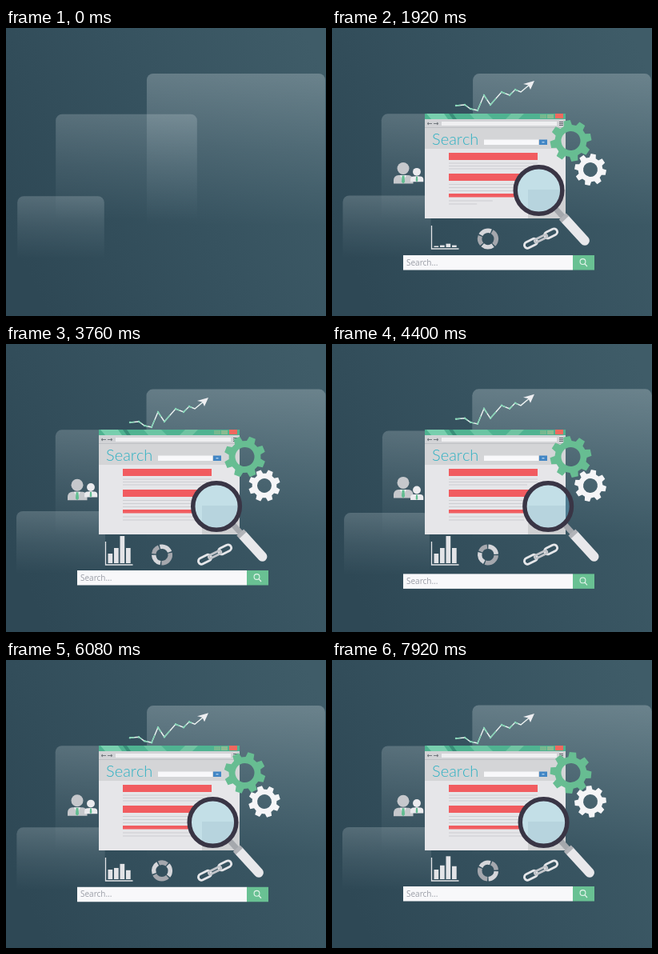
An HTML page with a canvas for the animation above (8000 ms loop, 400x360 px).

```html
<!DOCTYPE html>
<html lang="en">
<head>
<meta charset="utf-8">
<title>Search</title>
<style>
html, body { margin: 0; width: 100%; height: 100%; overflow: hidden; background: #34505e; }
canvas { display: block; width: 400px; height: 360px; }
</style>
</head>
<body>
<canvas id="stage" width="400" height="360"></canvas>
<script>
const c = document.getElementById('stage').getContext('2d');
const LOOP = 8000, STEP = 80, SWAY = 2100, TAU = Math.PI * 2;

const clamp = v => Math.max(0, Math.min(1, v));
const part = (t, from, to) => clamp((t - from) / (to - from));
const easeOut = (u, p = 3) => 1 - Math.pow(1 - u, p);
const smooth = u => (1 - Math.cos(Math.PI * u)) / 2;
const wave = (t, peak) => Math.cos((t - peak) / SWAY * TAU);
const mix = (a, b, u) => a + (b - a) * u;

function pop(t, from, to) {
  const u = part(t, from, to) - 1;
  return 1 + 2.4 * u * u * u + 1.4 * u * u;
}

function keys(t, list) {
  for (let i = 1; i < list.length; i++) {
    const [t0, a] = list[i - 1], [t1, b] = list[i];
    if (t < t1) return mix(a, b, smooth(part(t, t0, t1)));
  }
  return list[list.length - 1][1];
}

function rect(color, x, y, w, h) {
  c.fillStyle = color;
  c.fillRect(x, y, w, h);
}

function disc(color, x, y, r) {
  c.fillStyle = color;
  c.beginPath();
  c.arc(x, y, r, 0, TAU);
  c.fill();
}

function poly(color, points) {
  c.fillStyle = color;
  c.beginPath();
  points.forEach(p => c.lineTo(p[0], p[1]));
  c.fill();
}

function stroke(color, width, points) {
  c.strokeStyle = color;
  c.lineWidth = width;
  c.beginPath();
  points.forEach(p => c.lineTo(p[0], p[1]));
  c.stroke();
}

// Draws in a local frame scaled about (x, y).
function at(x, y, scale, angle, draw) {
  if (scale <= 0.01) return;
  c.save();
  c.translate(x, y);
  c.rotate(angle);
  c.scale(scale, scale);
  draw();
  c.restore();
}

function backdrop() {
  const g = c.createLinearGradient(0, 250, 400, 60);
  g.addColorStop(0, '#2e4855');
  g.addColorStop(0.5, '#36525f');
  g.addColorStop(1, '#3f5c68');
  rect(g, 0, 0, 400, 360);
}

function panel(x, y, w, fade, inset, alpha) {
  x += inset;
  y += inset;
  w -= inset * 2;
  const g = c.createLinearGradient(0, y, 0, y + fade);
  g.addColorStop(0, `rgba(225,235,238,${alpha})`);
  g.addColorStop(0.5, `rgba(215,228,233,${alpha * 0.45})`);
  g.addColorStop(1, 'rgba(205,222,230,0)');
  c.fillStyle = g;
  c.beginPath();
  c.roundRect(x, y, w, fade, [8, 8, 0, 0]);
  c.fill();
}

function panels(t) {
  panel(174.5, 55.5, 226, 190, -1.6 * wave(t, 3000), 0.27);
  panel(63, 108.5, 175, 132, 1.3 * wave(t, 2850), 0.22);
  panel(14.5, 210.5, 108, 78, 1.5 * wave(t, 2690), 0.21);
}

function heading(t) {
  c.font = '300 20px Lato, "Open Sans", sans-serif';
  c.fillStyle = '#2fb1c3';
  let x = 125;
  [...'Search'].forEach((ch, i) => {
    const w = c.measureText(ch).width;
    const s = easeOut(part(t, 980 - i * 70, 1330 - i * 70), 2);
    at(x + w / 2, 146, s, 0, () => c.fillText(ch, -w / 2, 0));
    x += w;
  });
}

function results(t) {
  const blocks = [
    [156, 111, 9, 760, [168.5, 172, 175.5]],
    [182, 111, 9, 1240, [195, 199, 203]],
    [207, 94, 4.5, 1560, [215.5, 219.5]]
  ];
  for (const [y, w, h, start, lines] of blocks) {
    rect('#f15c60', 146, y, w * easeOut(part(t, start, start + 300)), h);
    lines.forEach((ly, i) => {
      const from = start + 220 + i * 50;
      const full = i === 2 ? 98 : w;
      rect('#cdced2', 146, ly, full * part(t, from, from + 240), 1);
    });
  }
}

function browser(t) {
  const s = pop(t, 240, 640);
  if (t <= 240) return;
  at(204, 172, s, 0, () => {
    c.translate(-204, -172);
    rect('#e6e6e9', 116, 107, 176, 131);
    rect('#4fb391', 116, 107, 176, 7);
    poly('#78cfae', [[118, 107], [140, 107], [145, 114], [124, 114]]);
    poly('#398f79', [[146, 107], [151, 107], [156, 114], [151, 114]]);
    poly('#6ac5a3', [[172, 107], [194, 107], [201, 114], [178, 114]]);
    poly('#70c4a2', [[224, 107], [240, 107], [233, 114], [217, 114]]);
    rect('#76b88f', 260, 108, 8, 5);
    rect('#8bbb91', 269, 108, 8, 5);
    rect('#ef695f', 279, 107, 10, 6);
    rect('#d2d3d6', 116, 114, 176, 11);
    rect('#efeff1', 137, 117, 144, 5);
    for (const x of [119, 127]) {
      const d = x === 119 ? 1 : -1;
      stroke('#747a80', 1, [[x, 119.5], [x + 6, 119.5]]);
      const tip = d > 0 ? x : x + 6;
      stroke('#747a80', 1, [[tip + 2 * d, 118], [tip, 119.5], [tip + 2 * d, 121]]);
    }
    for (const y of [117, 119, 121]) rect('#60656d', 284, y, 5, 1);
    rect('#bfc1c5', 116, 124, 176, 1);
    rect('#d4d5d7', 116, 125, 176, 26);
    rect('#f8f8fa', 190, 139.5, 68, 6.5);
    rect('#4286c5', 259, 139.5, 10, 6.5);
    rect('#a9cbea', 262.5, 142, 3, 1.5);
    rect('#cfd0d2', 245, 202, 47, 36);
    heading(t);
    results(t);
  });
}

function gear(x, y, r, hole, color, scale, angle) {
  const teeth = 8, root = r * 0.77;
  at(x, y, scale, angle, () => {
    c.fillStyle = color;
    c.beginPath();
    for (let i = 0; i < teeth; i++) {
      const a = i / teeth * TAU;
      for (const [da, k] of [[-0.26, root], [-0.16, r], [0.16, r], [0.26, root]])
        c.lineTo(Math.cos(a + da) * k, Math.sin(a + da) * k);
    }
    c.closePath();
    c.moveTo(hole, 0);
    c.arc(0, 0, hole, 0, TAU, true);
    c.fill('evenodd');
  });
}

function gears(t) {
  const turn = t / 1000 * 0.31;
  gear(298.5, 141, 26, 12, '#67bd92', pop(t, 720, 1200) * part(t, 720, 800), turn);
  gear(323, 177, 20, 9, '#f5f5f7', pop(t, 900, 1400) * part(t, 900, 980), -turn);
}

function lens(t) {
  const enter = 240 * Math.pow(1 - part(t, 800, 1600), 3);
  if (t < 800) return;
  const x = 276.9 + 18.4 * wave(t, 2950) + enter, y = 203;
  c.save();
  c.globalAlpha = mix(0.75, 1, part(t, 800, 1500));
  at(x, y, 1, 0.83, () => {
    rect('#a5a8ad', 31, -3.5, 17, 7);
    c.fillStyle = '#e8e8eb';
    c.beginPath();
    c.roundRect(47, -6, 44, 12, [2, 6, 6, 2]);
    c.fill();
    rect('#b1b3b8', 44, -6, 5, 12);
  });
  c.save();
  c.beginPath();
  c.arc(x, y, 29, 0, TAU);
  c.clip();
  rect('#4e7b90', x - 30, y - 30, 60, 60);
  rect('#c3dfe7', 116, 107, 176, 131);
  rect('#b7d4de', 245, 202, 47, 36);
  c.restore();
  c.strokeStyle = '#393545';
  c.lineWidth = 5.5;
  c.beginPath();
  c.arc(x, y, 29.3, 0, TAU);
  c.stroke();
  c.restore();
}

function trend(t, lift) {
  const show = part(t, 930, 1680);
  if (!show) return;
  const pts = [[155, 92], [166, 91], [173, 96], [182, 98], [190, 79], [198, 91],
    [212, 75], [222, 79], [229, 72], [236, 75], [248, 65]];
  c.save();
  c.translate(0, 6 * lift);
  c.beginPath();
  c.rect(150, 40, 5 + 100 * show, 80);
  c.clip();
  stroke('#eef4f3', 1.4, pts);
  for (let i = 0; i < 9; i++) {
    const [x, y] = pts[i], [u, v] = pts[i + 1];
    stroke('#7fd3b2', 1.4, [[x, y], [mix(x, u, 0.5), mix(y, v, 0.5)]]);
    disc('#8bdabb', x, y, 1.2);
  }
  poly('#eeeef1', [[253, 61], [248, 72], [245.5, 66.5], [239, 65]]);
  c.restore();
}

function person(x, y, k, color, scale) {
  at(x, y, scale * k, 0, () => {
    disc(color, 0, 0, 7.5);
    c.fillStyle = color;
    c.beginPath();
    c.roundRect(-12, 8.5, 24.5, 10.5, [6, 6, 0, 0]);
    c.fill();
    poly('#f1f1f3', [[-4, 8.5], [4, 8.5], [0, 16]]);
    poly('#62bd91', [[-1.5, 9], [1.5, 9], [2, 17], [0, 19], [-2, 17]]);
  });
}

function people(t, lift) {
  person(89, 172.2 + 4 * lift, 1, '#c6c8cc', pop(t, 1360, 1760) * part(t, 1360, 1440));
  person(106, 184 - 5 * lift, 0.66, '#ebebee', pop(t, 1480, 1880) * part(t, 1480, 1560));
}

function chart(t) {
  const show = easeOut(part(t, 1300, 1700));
  if (!show) return;
  stroke('#e4e5e8', 1.3, [[124.5, 276 - 29 * show], [124.5, 276], [124.5 + 34 * show, 276]]);
  const size = keys(t, [[1600, 0], [2900, 0.9], [3400, 1], [5300, 1], [6300, 0.2],
    [6960, 0], [8200, 0.85]]);
  const grown = t < 3400 ? 0 : 1;
  [[12, 12], [19, 12], [34, 13], [19, 8]].forEach(([hi, lo], i) => {
    rect('#e3e4e7', 127.5 + i * 7.5, 274, 5.7, -mix(lo * grown, hi, size));
  });
}

function donut(t) {
  const s = pop(t, 1500, 1900) * part(t, 1500, 1580);
  at(195, 263.5, s, t / 1000 * 0.45, () => {
    const cuts = [0, 1.5, 2.7, 4.3, TAU];
    c.lineWidth = 5.5;
    for (let i = 0; i < 4; i++) {
      c.strokeStyle = i % 2 ? '#a4a7ad' : '#d5d6da';
      c.beginPath();
      c.arc(0, 0, 10.3, cuts[i] + 0.07, cuts[i + 1] - 0.07);
      c.stroke();
    }
  });
}

function chain(t) {
  const s = keys(t, [[820, 0], [1120, 1.2], [1400, 1]]);
  at(240, 273.5, s, -0.46, () => {
    for (const [x, w, color] of [[1, 17, '#e6e7ea'], [29, 17, '#e6e7ea'], [15, 17, '#c2c5ca']]) {
      c.strokeStyle = color;
      c.lineWidth = 2.8;
      c.beginPath();
      if (x === 15) c.roundRect(x, -2, w, 4, 2);
      else c.roundRect(x, -4, w, 8, 4);
      c.stroke();
    }
  });
}

function searchBar(t, lift) {
  const grow = easeOut(part(t, 700, 1300), 2);
  if (!grow) return;
  const y = 289.3 - 6.3 * lift, left = 301 - 212 * grow;
  rect('#f8f8fa', left, y, 301 - left, 18.5);
  rect('#69c193', 301, y, 27, 18.5);
  c.strokeStyle = '#e4f4ec';
  c.lineWidth = 1.1;
  c.beginPath();
  c.arc(313.5, y + 8, 3.4, 0, TAU);
  c.stroke();
  stroke('#e4f4ec', 1.2, [[316, y + 10.7], [319, y + 14]]);
  const count = Math.floor((t - 1000) / 80);
  if (count < 1) return;
  c.font = '10px "Open Sans", "Noto Sans", sans-serif';
  c.fillStyle = '#9a9da6';
  c.fillText('Search...'.slice(0, count), left + 4, y + 12.6);
}

function draw(t) {
  const lift = (1 - wave(t, 2690)) / 2;
  backdrop();
  panels(t);
  trend(t, lift);
  browser(t);
  gears(t);
  people(t, lift);
  chart(t);
  donut(t);
  chain(t);
  searchBar(t, lift);
  lens(t);
}

const start = performance.now();
function frame(now) {
  const t = Math.max(0, now - start) % LOOP;
  draw(Math.floor(t / STEP) * STEP);
  requestAnimationFrame(frame);
}
draw(0);
requestAnimationFrame(frame);
</script>
</body>
</html>
```
